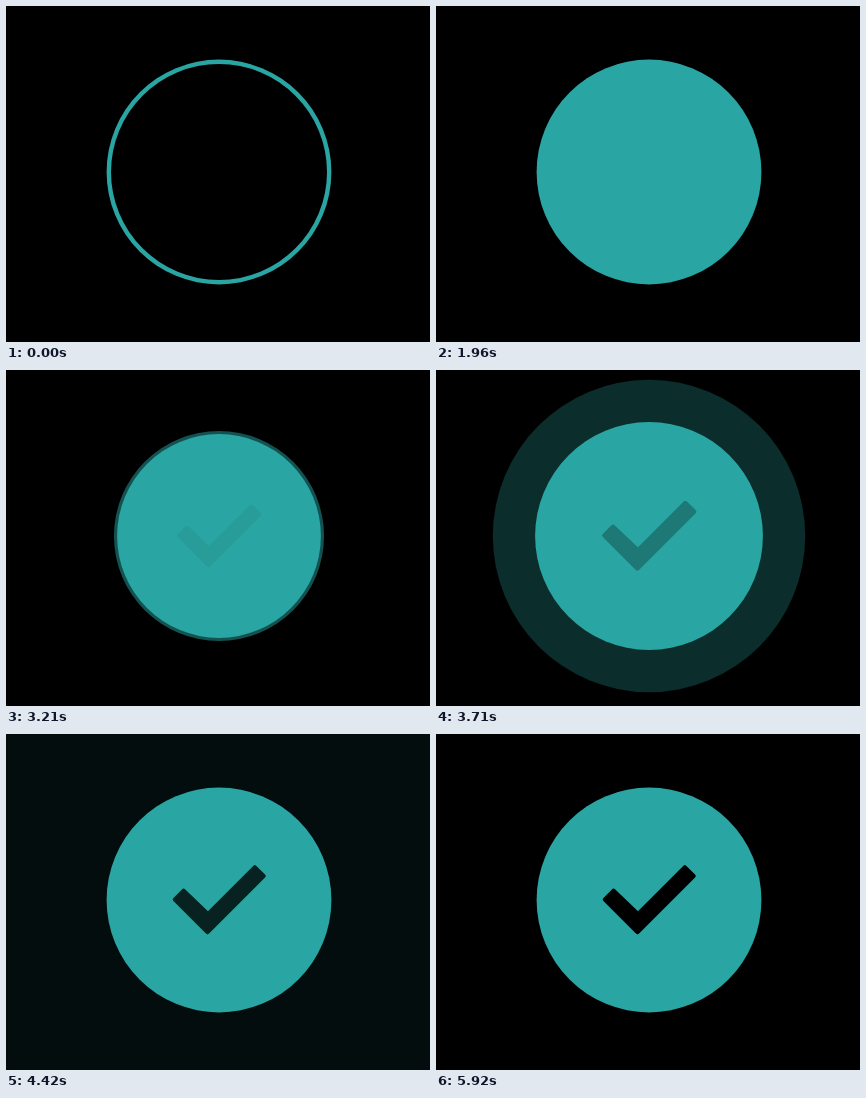
An HTML page with a canvas that plays this animation: 424x336 px, repeating every 6090 ms.

```html
<!DOCTYPE html>
<html lang="en">
<head>
<meta charset="utf-8">
<title>Check button</title>
<style>
html, body { margin: 0; overflow: hidden; background: #000; }
canvas { display: block; }
</style>
</head>
<body>
<canvas id="stage" width="424" height="336"></canvas>
<script>
const ctx = document.getElementById('stage').getContext('2d');
const LOOP = 6090, CX = 213, CY = 166, RADIUS = 112.4;
const WAVE_START = 2835, WAVE_END = 5210, CHECK_TIME = 1800;

const clamp = x => Math.min(1, Math.max(0, x));
const progress = (t, from, to) => clamp((t - from) / (to - from));
const smooth = x => x * x * (3 - 2 * x);
const teal = k => `rgb(${41 * k}, ${166 * k}, ${163 * k})`;

// Press in, spring out past full size, settle
function buttonRadius(t) {
  const press = smooth(progress(t, 2170, 3080));
  const release = smooth(progress(t, 3080, 3650));
  const settle = smooth(progress(t, 3650, 4050));
  return RADIUS - 12.4 * press + 14 * release - 1.6 * settle;
}

function disc(radius, color) {
  ctx.fillStyle = color;
  ctx.beginPath();
  ctx.arc(CX, CY, radius, 0, Math.PI * 2);
  ctx.fill();
}

function check(scale, color) {
  ctx.save();
  ctx.translate(CX, CY);
  ctx.scale(scale, scale);
  ctx.beginPath();
  for (const [x, y] of [[-44, -0.5], [-35.5, -9], [-11, 14.3], [35.8, -32.5], [44.5, -24], [-11.5, 32]])
    ctx.lineTo(x, y);
  ctx.closePath();
  ctx.fillStyle = ctx.strokeStyle = color;
  ctx.lineWidth = 4.5;
  ctx.lineJoin = 'round';
  ctx.fill();
  ctx.stroke();
  ctx.restore();
}

function draw(t) {
  ctx.fillStyle = '#000';
  ctx.fillRect(0, 0, 424, 336);

  const since = Math.max(0, t - WAVE_START);
  if (since > 0) {
    const fade = 1 - progress(t, WAVE_START, WAVE_END);
    disc(93.5 + 8.17e-5 * since ** 2, teal(0.7 * fade ** 2));
  }

  const radius = buttonRadius(t);
  disc(radius, teal(1));
  const filled = progress(t, 930, 1040);
  if (filled < 1) disc(RADIUS - 4.4, teal(filled));

  const shown = clamp(since / CHECK_TIME) ** 1.8;
  if (shown > 0) check(radius / RADIUS, teal(1 - shown));
}

function tick() {
  draw(performance.now() % LOOP);
  requestAnimationFrame(tick);
}
tick();
</script>
</body>
</html>
```
